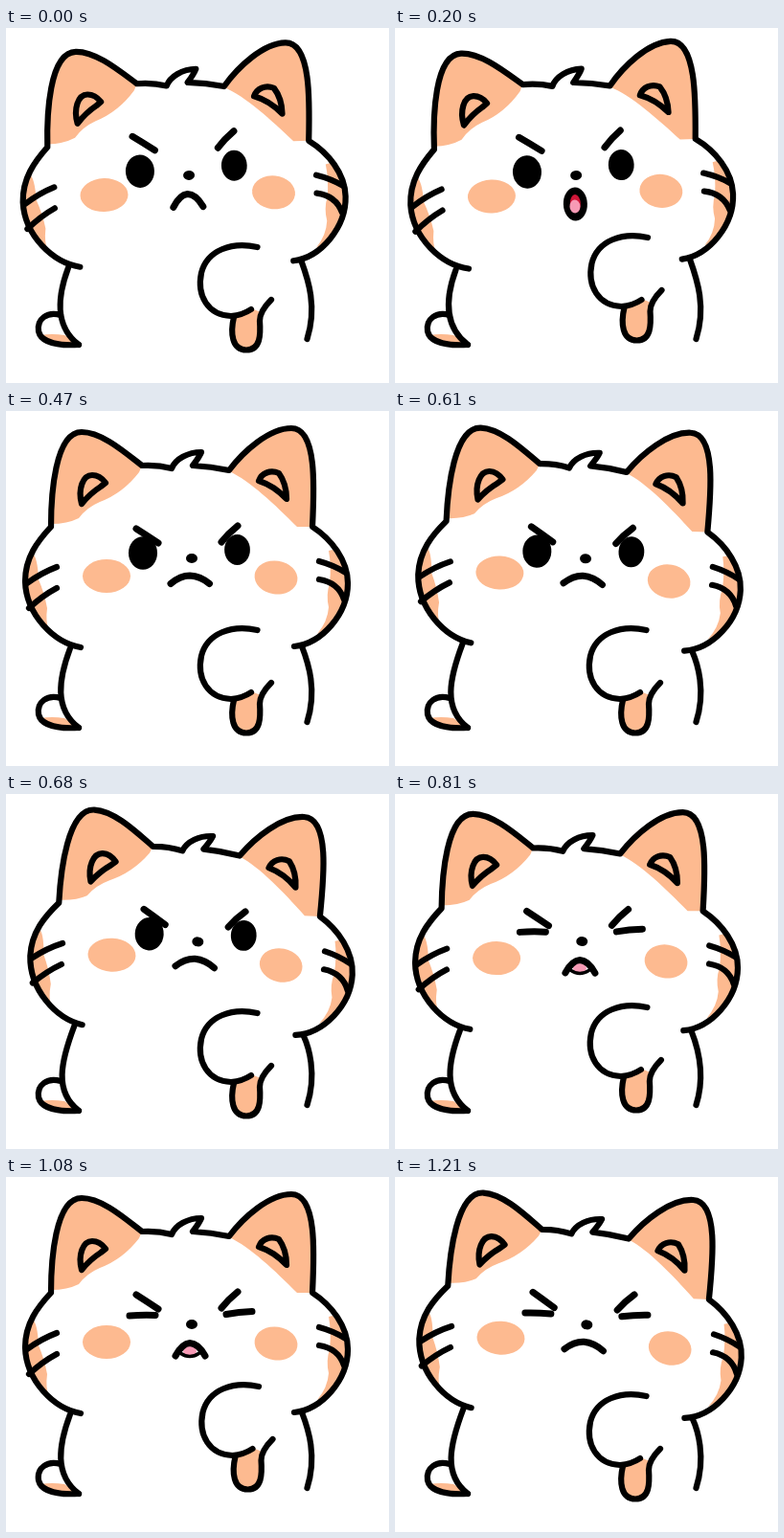
An HTML page that plays this animation: 400 by 371 pixels, repeating every 1280 ms.

```html
<!DOCTYPE html>
<html lang="en">
<head>
<meta charset="utf-8">
<title>Grumpy cat</title>
<style>
  html, body { margin: 0; width: 100%; height: 100%; overflow: hidden; background: #fff; }
  svg { display: block; width: 100%; height: 100%; }
  .line { fill: none; stroke: #000; stroke-width: 6.2; stroke-linecap: round; stroke-linejoin: round; }
  .bold { stroke-width: 7; }
  .fur { fill: #fdba90; }
  .tongue { fill: #f79ab5; }
</style>
</head>
<body>
<svg viewBox="0 0 400 371">
  <!-- tail and body -->
  <path class="fur" d="M36 321 Q48 319 61 321 L76 331 Q42 334 36 321Z"/>
  <path class="line" d="M57 300 C43 296 32 304 34 317 C37 330 58 332 76 331"/>
  <path class="line" id="left"/>
  <path class="line" id="right"/>

  <g id="head">
    <g class="fur">
      <path d="M47 121 C47 88 51 22 79 22 C100 22 124 43 142 57 L139 64 Q122 86 98 95 Q84 101 76 112 Q64 118 47 118Z"/>
      <path d="M233 62 C248 42 275 18 298 18 C325 18 322 80 320 121 L304 121 C281 98 255 73 233 63Z"/>
      <path d="M27 148 Q33 152 34 176 Q40 190 43 206 Q41 221 45 229 C28 215 20 195 20 178 Q21 158 27 148Z"/>
      <path d="M341 145 Q356 160 357 180 C356 203 345 222 325 233 Q336 220 337 205 Q334 192 338 180 Q340 162 337 146Z"/>
      <ellipse cx="105" cy="172.5" rx="25" ry="17.5"/>
      <ellipse cx="282" cy="174" rx="22.5" ry="17.5" transform="rotate(8 282 174)"/>
    </g>
    <g class="line">
      <path d="M78 247 C50 242 21 213 20 178 C20 153 33 136 47 121 C47 88 51 22 79 22 C100 22 124 43 142 57 Q158 56 173 60 C177 50 190 43 204 43 Q202 48 195 57 Q214 58 233 62 C248 42 275 18 298 18 C325 18 322 80 320 121 C340 134 357 156 357 180 C357 212 330 243 301 246"/>
      <path d="M79 97 C75 82 80 67 90 67 Q98 67 104 75 L99 79 Q88 86 79 97Z"/>
      <path d="M264 73 C267 65 276 61 285 65 Q293 76 293 92 Q280 78 264 73Z"/>
      <path d="M53 163 Q37 169 22 180 M53 185 Q38 193 24 206"/>
      <path d="M327 157 Q342 161 355 169 M327 176 Q347 179 353 197"/>
    </g>
    <ellipse cx="194" cy="154" rx="6" ry="5"/>

    <path class="line bold" id="brows" d="M136 123 Q147 130 159 138 M242 120 Q232 128 225 137"/>
    <g id="open">
      <ellipse cx="143" cy="148.5" rx="15" ry="17.2"/>
      <ellipse cx="241.5" cy="145" rx="13.4" ry="16"/>
    </g>
    <path class="line bold" id="shut" d="M129 145 Q142 144 156 144.5 M230 143.5 Q243 141 257 140.5"/>

    <path class="line bold" id="frown" d="M172 180.5 Q182 172 192 172 Q203 172.5 212.5 180.500"/>
    <path class="line bold" id="arch" d="M177 187 Q184 174 192 173.500 Q201 174 208 187"/>
    <g id="small">
      <ellipse class="tongue" cx="192" cy="182" rx="7" ry="5"/>
      <path class="line bold" d="M177 187 Q184 174 192 173.500 Q201 174 208 187"/>
      <path class="line" style="stroke-width: 3.5" d="M182 184 Q192 191 202 184"/>
    </g>
    <g id="wide">
      <ellipse cx="192" cy="184" rx="12.500" ry="17.500"/>
      <ellipse cx="192" cy="183.500" rx="5.500" ry="9.500" fill="#cf1638"/>
      <ellipse class="tongue" cx="191.500" cy="186.500" rx="5.500" ry="7"/>
    </g>
  </g>

  <g id="arm">
    <path class="fur" d="M236 302 Q249 300 256 293 L266 297 Q268 336 251 337 Q236 336 236 302Z"/>
    <path class="line" d="M262.500 229 C236 223 210 232 204 256 C199 280 211 300 235 301 Q247 300 256 294"/>
    <path class="line" d="M238 302 C234 319 236 336.500 251 336.500 C266 336.500 266 320 265 306 Q265 296 277 284"/>
  </g>
</svg>
<script>
const LOOP = 1280;
const $ = id => document.getElementById(id);

// start ms, head tilt in degrees, arm lift, brow lift, mouth
const steps = [
  [0, -1.4, 0, 1, 'arch'],
  [70, -2, .5, 1, 'small'],
  [140, -2.3, .9, 1, 'wide'],
  [200, -2.3, 1, 1, 'wide'],
  [270, -2.2, 1, 1, 'wide'],
  [340, -1.5, .6, .6, 'small'],
  [400, -.7, .2, .2, 'arch'],
  [470, 0, 0, 0, 'frown'],
  [540, 1.2, 0, 0, 'frown'],
  [610, 2.4, 0, 0, 'frown'],
  [680, 3, 0, 0, 'frown'],
  [740, 2, .2, 0, 'arch'],
  [810, .6, .6, 0, 'small'],
  [880, -.4, 1, 0, 'wide'],
  [940, 0, 1, 0, 'wide'],
  [1010, 0, 1, 0, 'wide'],
  [1080, 0, 1, 0, 'small'],
  [1140, 1.5, .4, 0, 'arch'],
  [1210, 3, 0, 0, 'frown']
];
const SQUINT_FROM = 810;
const mouths = ['frown', 'arch', 'small', 'wide'];

const show = (id, on) => $(id).setAttribute('visibility', on ? 'visible' : 'hidden');
const move = (id, value) => $(id).setAttribute('transform', value);

function draw(t) {
  const [start, tilt, lift, brow, mouth] = steps.findLast(s => s[0] <= t);
  move('head', `rotate(${tilt} 190 275)`);
  move('arm', `translate(${1.5 * lift} ${-10 * lift})`);
  move('brows', `translate(0 ${-11 * brow})`);
  $('left').setAttribute('d', `M${67 + 1.5 * tilt} ${248 - 2 * tilt} C${55 + .7 * tilt} 280 50 311 76 331`);
  $('right').setAttribute('d', `M${309 + .5 * tilt} ${246 + 2 * tilt} C316 264 325 292 314.5 325`);
  show('open', start < SQUINT_FROM);
  show('shut', start >= SQUINT_FROM);
  mouths.forEach(m => show(m, m === mouth));
}

function tick() {
  draw(performance.now() % LOOP);
  requestAnimationFrame(tick);
}
tick();
</script>
</body>
</html>
```
